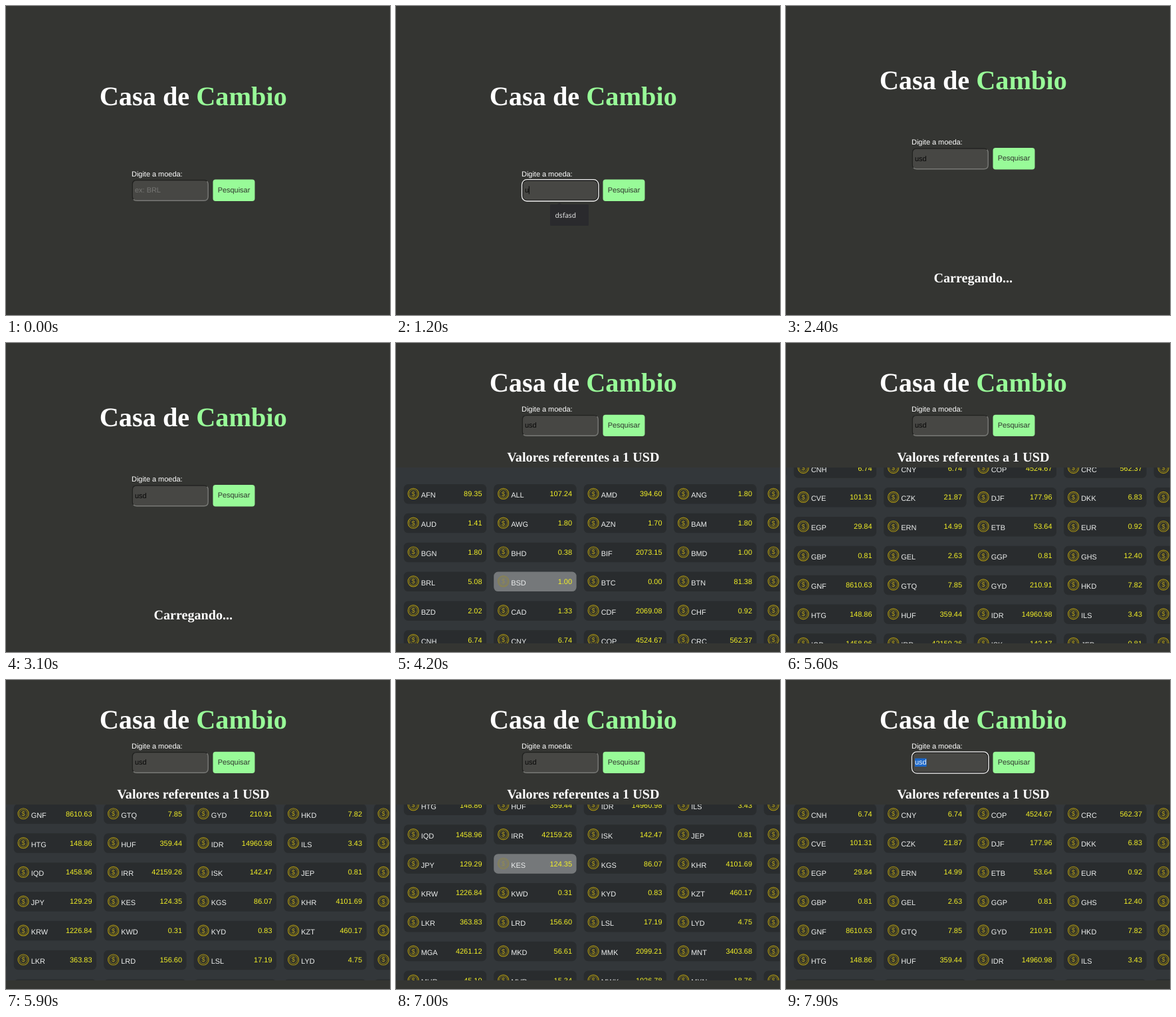
An HTML page that plays this animation: 578x464 px, repeating every 8 s.

```html
<!DOCTYPE html>
<html lang="pt">
<head>
<meta charset="utf-8">
<title>Casa de Cambio</title>
<style>
html, body { margin: 0; width: 100%; height: 100%; overflow: hidden; background: #343532; }
svg { display: block; width: 578px; height: 464px; }
text { font: 10.95px "Liberation Sans", Arial, sans-serif; fill: #fff; text-rendering: geometricPrecision; white-space: pre; }
.serif { font: bold 40.3px "Liberation Serif", "Times New Roman", serif; text-anchor: middle; }
.sub { font-size: 20.1px; }
.mint { fill: #98fb98; }
.mid { text-anchor: middle; }
.card rect { fill: #292c2e; }
.card.hover rect { fill: #75787a; }
.card.hover .coin { opacity: .5; }
.card .code { fill: #eceeee; }
.card .value { fill: #f4f126; text-anchor: end; }
.coin circle { fill: none; stroke: #a89312; }
.coin text { fill: #b8a214; text-anchor: middle; }
</style>
</head>
<body>
<svg viewBox="0 0 578 464">
  <defs><clipPath id="view"><rect y="187" width="578" height="264"/></clipPath></defs>
  <g id="results">
    <rect y="187" width="578" height="264" fill="#33373a"/>
    <g clip-path="url(#view)"><g id="list"></g></g>
    <text class="serif sub" x="281.8" y="178">Valores referentes a 1 USD</text>
  </g>
  <text id="loading" class="serif sub" x="281.8" y="415">Carregando...</text>
  <text id="title" class="serif" x="281.8" y="149">Casa de <tspan class="mint">Cambio</tspan></text>
  <g id="form">
    <text x="189" y="255.9">Digite a moeda:</text>
    <rect x="189.5" y="260.8" width="115.3" height="32" rx="7" fill="#474744"/>
    <g id="inset" fill="none" stroke-width="1.4">
      <path d="M191.8 290.4Q190.2 288.600 190.2 286V268Q190.200 261.500 197 261.500H298Q301 261.500 302.600 263.200" stroke="#20211f"/>
      <path d="M302.600 263.200Q304.200 265 304.200 268V286Q304.200 292.200 298 292.200H197Q193.500 292.200 191.800 290.400" stroke="#787976"/>
    </g>
    <g id="ring" fill="none">
      <rect x="190.700" y="262" width="113" height="29.800" rx="6" stroke="#151514" stroke-width="1.300"/>
      <rect x="189.500" y="260.700" width="115.400" height="32.300" rx="7.500" stroke="#f4f4f4" stroke-width="1.300"/>
    </g>
    <rect id="mark" x="194" y="270.500" width="17.500" height="12.500" fill="#1b67c9"/>
    <text id="field" x="194" y="280.300"></text>
    <rect id="caret" y="270.500" width="1" height="12" fill="#080808"/>
    <rect x="311.500" y="260.600" width="63" height="32.400" rx="4" class="mint"/>
    <text class="mid" x="343" y="279.500" style="fill:#30332e">Pesquisar</text>
  </g>
  <g id="hint">
    <path d="M242 298.500L246 295.500L250 298.500Z" fill="#2a2a2d"/>
    <rect x="232" y="298" width="58" height="32" rx="1.500" fill="#2a2a2d"/>
    <text x="239.500" y="317.800" style="font:10.200px 'Noto Sans',sans-serif;fill:#e6e6e6">dsfasd</text>
  </g>
</svg>
<script>
const LOOP = 8000, STEP = 100, PITCH = 43.85, COL = 135.5, TOP = 212, SCROLL = 245;
const rates = `AFN 89.35 ALL 107.24 AMD 394.60 ANG 1.80
AUD 1.41 AWG 1.80 AZN 1.70 BAM 1.80
BGN 1.80 BHD 0.38 BIF 2073.15 BMD 1.00
BRL 5.08 BSD 1.00 BTC 0.00 BTN 81.38
BZD 2.02 CAD 1.33 CDF 2069.08 CHF 0.92
CNH 6.74 CNY 6.74 COP 4524.67 CRC 562.37
CVE 101.31 CZK 21.87 DJF 177.96 DKK 6.83
EGP 29.84 ERN 14.99 ETB 53.64 EUR 0.92
GBP 0.81 GEL 2.63 GGP 0.81 GHS 12.40
GNF 8610.63 GTQ 7.85 GYD 210.91 HKD 7.82
HTG 148.86 HUF 359.44 IDR 14960.98 ILS 3.43
IQD 1458.96 IRR 42159.26 ISK 142.47 JEP 0.81
JPY 129.29 KES 124.35 KGS 86.07 KHR 4101.69
KRW 1226.84 KWD 0.31 KYD 0.83 KZT 460.17
LKR 363.83 LRD 156.60 LSL 17.19 LYD 4.75
MGA 4261.12 MKD 56.61 MMK 2099.21 MNT 3403.68
MUR 45.10 MVR 15.34 MWK 1026.78 MXN 18.76`.split("\n").map(row => row.split(" "));

const $ = id => document.getElementById(id);
const show = (id, on) => { $(id).style.display = on ? "" : "none"; };
const shift = (id, y) => $(id).setAttribute("transform", `translate(0 ${y})`);

function card(row, col) {
  const code = rates[row][col * 2] || "", value = rates[row][col * 2 + 1] || "";
  return `<g class="card" id="${code}" transform="translate(${11.7 + col * COL} ${TOP + row * PITCH})">
    <rect width="124.400" height="29.500" rx="6.500"/>
    <g class="coin"><circle cx="14.400" cy="14.300" r="8" stroke-width="1.200"/>
    <circle cx="14.400" cy="14.300" r="5.900" stroke-width=".8"/>
    <text x="14.400" y="17.800" style="font-size:10px">$</text></g>
    <text class="code" x="26" y="20.300">${code}</text>
    <text class="value" x="117.800" y="18.300">${value}</text></g>`;
}
// Columns -1 and 4 run past the stage edges.
$("list").innerHTML = rates.map((_, row) => [-1, 0, 1, 2, 3, 4].map(col => card(row, col)).join("")).join("");

// [start, value] tables; the last entry already begun applies
const typed = [[0, ""], [1200, "u"], [1400, "us"], [1600, "usd"]];
const caretX = [[0, 0], [300, 194], [900, 0], [1200, 199.8], [1400, 205.3], [1600, 211], [2200, 0]];
const layout = [[0, [0, 0]], [2400, [-24, -47.5]], [3700, [-76, -152.900]]];
const hovers = [[0, ""], [3700, "AZN"], [4100, "BHD"], [4200, "BSD"], [5500, ""], [6500, "LRD"], [6600, "KWD"], [6700, "KES"], [7900, ""]];
const scrolls = [[4500, 1], [5500, 1], [6900, -1]];

const at = (table, t) => table.filter(e => e[0] <= t).pop()[1];
const glide = x => 1 - Math.pow(1 - Math.pow(x, 2.2), 6.83);
const scrollAt = t => scrolls.reduce((sum, [start, dir]) =>
  sum + dir * SCROLL * glide(Math.min(1, Math.max(0, (t - start) / 900))), 0);

let hovered = null;
function draw(t) {
  const [titleY, formY] = at(layout, t);
  const word = at(typed, t), x = at(caretX, t), selected = t >= 7900;
  const focus = selected || (t >= 300 && t < 2400);
  shift("title", titleY);
  shift("form", formY);
  shift("list", -scrollAt(t));
  show("loading", t >= 2400 && t < 3700);
  show("results", t >= 3700);
  show("hint", t >= 400 && t < 1300);
  show("ring", focus);
  show("inset", !focus);
  show("mark", selected);
  show("caret", x > 0);
  $("caret").setAttribute("x", x);
  $("field").textContent = word || (t < 1200 ? "ex: BRL" : "");
  $("field").style.fill = selected ? "#f2f6fa" : word ? "#080808" : "#767674";
  if (hovered) hovered.classList.remove("hover");
  hovered = $(at(hovers, t));
  if (hovered) hovered.classList.add("hover");
}

const begin = performance.now();
let last = -1;
function tick() {
  const t = Math.floor((performance.now() - begin) % LOOP / STEP) * STEP;
  if (t !== last) draw(last = t);
  requestAnimationFrame(tick);
}
draw(0);
tick();
</script>
</body>
</html>
```
